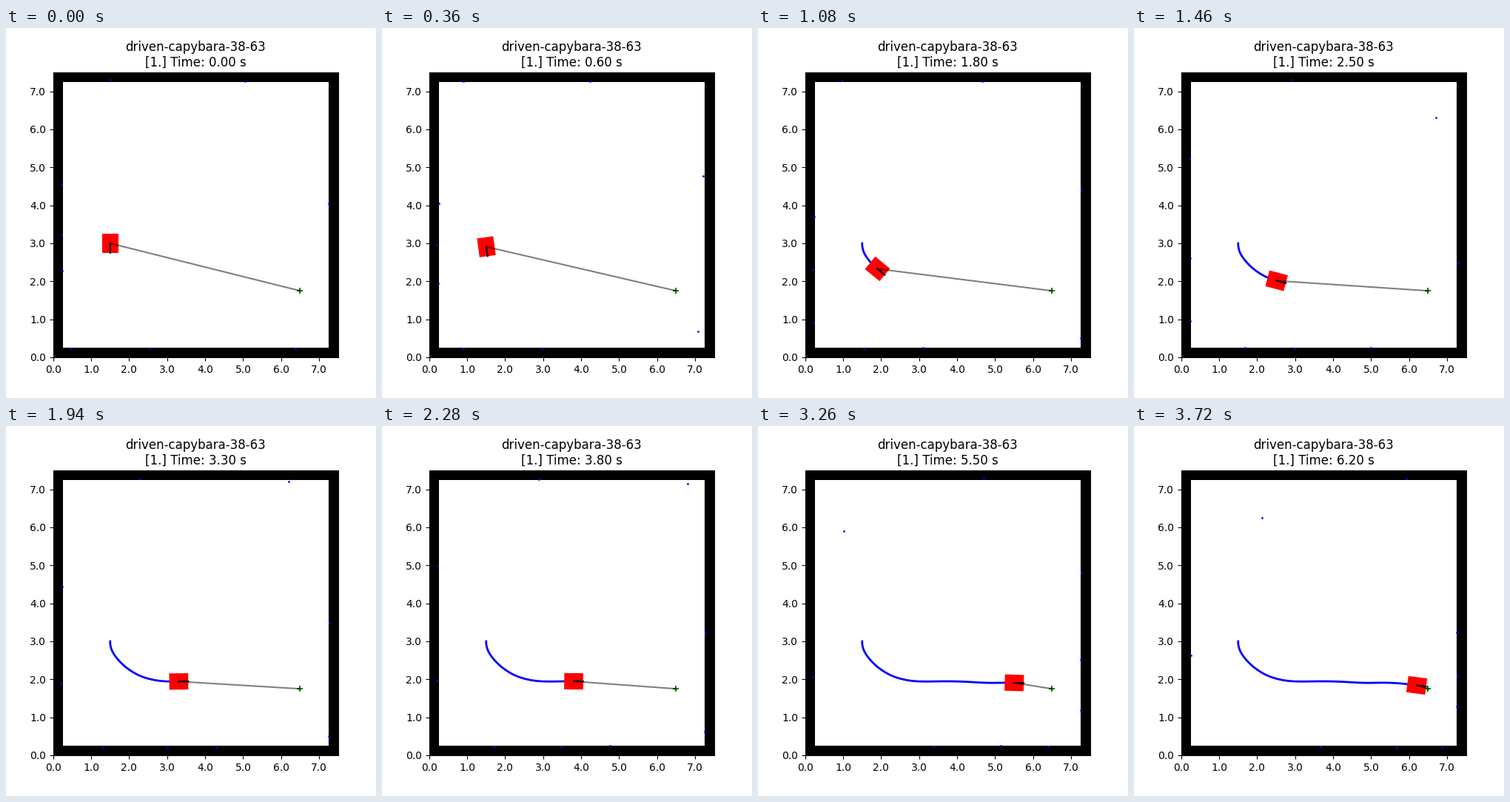
These frames come from a looping animation (500x500 px, 3.82 s). A matplotlib script:

```python
import matplotlib.pyplot as plt
import numpy as np
from matplotlib.animation import FuncAnimation
from matplotlib.patches import Polygon

SIZE, WALL = 7.5, 0.25
GOAL = np.array([6.5, 1.75])
LENGTH, WIDTH = 0.5, 0.43
MAX_RANGE, RAY_STEP = 6.0, 0.05
LAST_STEP = 62
DT = 0.01

# Heading of the robot in degrees at a few moments in seconds
TURN_T = [0, 0.4, 0.8, 1.2, 1.6, 2.0, 2.5, 2.8, 3.0, 3.3,
          3.6, 4.0, 4.4, 4.7, 5.0, 5.5, 5.8, 6.2]
TURN_DEG = [-90, -87, -75.5, -57.3, -45.5, -33, -14.8, -6.8, -2, 0.7,
            0.5, -1.6, -3.2, -2.5, 0.8, -1.8, -5.5, -7.5]


def hermite(t, xs, ys):
    """Smooth cubic curve through the given points."""
    xs, ys = np.array(xs, float), np.array(ys, float)
    slope = np.gradient(ys, xs)
    slope[0] = 0
    i = np.clip(np.searchsorted(xs, t, side="right") - 1, 0, len(xs) - 2)
    h = xs[i + 1] - xs[i]
    u = (t - xs[i]) / h
    return ((1 + 2 * u) * (1 - u) ** 2 * ys[i] + u * (1 - u) ** 2 * h * slope[i]
            + u * u * (3 - 2 * u) * ys[i + 1] + u * u * (u - 1) * h * slope[i + 1])


def integrate(rate):
    return np.concatenate([[0], np.cumsum((rate[1:] + rate[:-1]) / 2 * DT)])


def drive():
    """Position and heading at every tenth of a second."""
    t = np.arange(LAST_STEP * 10 + 1) * DT
    speed = np.minimum(0.5 * t, 1)
    theta = np.radians(hermite(t, TURN_T, TURN_DEG))
    x = 1.5 + integrate(speed * np.cos(theta))
    y = 3.0 + integrate(speed * np.sin(theta))
    return np.column_stack([x, y])[::10], theta[::10]


path, heading = drive()

# Range finder beams, spread symmetrically from the rear
side = 180 - 39.85 * np.arange(1, 5)
beams = np.radians(np.concatenate([[180], side, -side]))
reach = np.arange(1, round(MAX_RANGE / RAY_STEP) + 1) * RAY_STEP


def scan(pos, theta):
    """First point of each beam inside a wall, or its far end."""
    hits = []
    for a in theta + beams:
        pts = pos + reach[:, None] * np.array([np.cos(a), np.sin(a)])
        low, high = WALL - 1e-6, SIZE - WALL + 1e-6
        blocked = np.any((pts < low) | (pts > high), axis=1)
        hits.append(pts[blocked.argmax() if blocked.any() else -1])
    return np.array(hits)


def body(pos, theta):
    c, s = np.cos(theta), np.sin(theta)
    corners = np.array([[1, 1], [1, -1], [-1, -1], [-1, 1]]) * [LENGTH / 2, WIDTH / 2]
    return pos + corners @ np.array([[c, s], [-s, c]])


fig, ax = plt.subplots(figsize=(5, 5), dpi=100)
grid = np.ones((30, 30))
grid[1:-1, 1:-1] = 0
ax.imshow(grid, cmap="gray_r", origin="lower", extent=(0, SIZE, 0, SIZE),
          interpolation="nearest")
ax.set_xticks(range(8))
ax.set_yticks(range(8))
ax.xaxis.set_major_formatter("{x:.1f}")
ax.yaxis.set_major_formatter("{x:.1f}")

title = ax.set_title("")
trail, = ax.plot([], [], "b", lw=2, zorder=2)
robot = ax.add_patch(Polygon(body(path[0], heading[0]), fc="r", ec="none", zorder=3))
ax.scatter(*GOAL, c="g", marker="+", zorder=3.5)
nose, = ax.plot([], [], "k", lw=1.5, zorder=4)
aim, = ax.plot([], [], "k", lw=1.5, alpha=0.5, zorder=5)
dots = ax.scatter([], [], s=1, c="b", zorder=4)
ax.set_xlim(0, SIZE)
ax.set_ylim(0, SIZE)


def update(tick):
    # Steps are held in turn for one tick and for five ticks
    k = min(2 * (tick // 6) + (tick % 6 > 0), LAST_STEP)
    pos, theta = path[k], heading[k]
    tip = pos + 0.25 * np.array([np.cos(theta), np.sin(theta)])
    title.set_text(f"driven-capybara-38-63\n[1.] Time: {k / 10:.2f} s")
    trail.set_data(path[:k + 1, 0], path[:k + 1, 1])
    robot.set_xy(body(pos, theta))
    nose.set_data(*zip(pos, tip))
    aim.set_data(*zip(pos, GOAL))
    dots.set_offsets(scan(pos, theta))
    return title, trail, robot, nose, aim, dots


anim = FuncAnimation(fig, update, frames=191, interval=20, repeat=True, repeat_delay=0)
plt.show()
```
